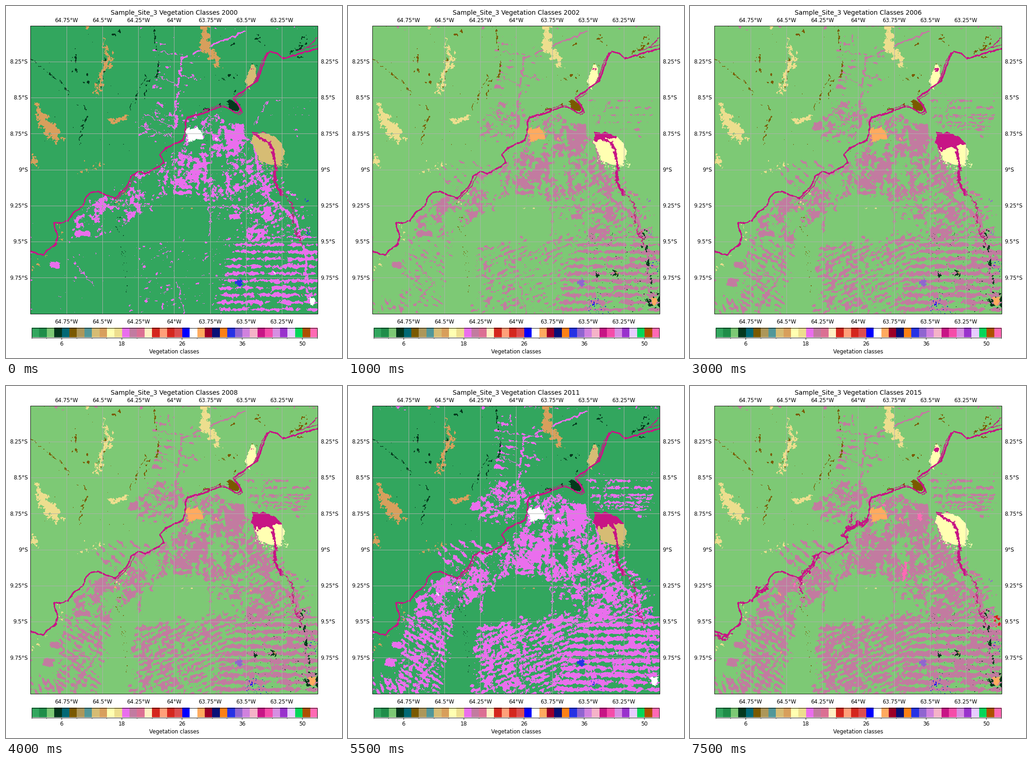
A matplotlib script for the animation above (8000 ms loop, 732 by 765 pixels).

```python
import numpy as np
import matplotlib.pyplot as plt
from matplotlib.animation import FuncAnimation
from matplotlib.path import Path
from matplotlib.colors import to_rgb

W, H, N = 732, 765, 626
L, R, T, B = 53.4, 679.2, 42.8, 668.6
YEARS = range(2000, 2016)

BAR = """32a65e 1f8d49 7dc975 04381d 026975 7a5900 ad975a 519799 d6bc74 d89f5c
ffffb2 edde8e ea6eed c27ba0 db7093 ffefc3 d4271e ffa07a d4271e db4d4f 0000ff
ffffff ffaa5f 9c0027 091077 fc8114 2532e4 9065d0 d082de f5b3c8 c71585 f54ca9
d68fe2 9932cc e6ccff 02d659 ad5100 ff69b4""".split()
RGB = np.array([to_rgb("#" + c) for c in BAR])

(FOREST, PASTURE, WATER, SAVANNA, FIELD, FLOODED, URBAN, CROP, SOY,
 DARK, RED, PINK) = range(12)
# Colour bar slot of each class in the two colour scalings
SCALE_A = np.array([0, 12, 30, 9, 8, 3, 21, 26, 26, 0, 18, 19])
SCALE_B = np.array([2, 13, 30, 11, 10, 5, 22, 27, 20, 3, 18, 37])
A_YEARS = {2000, 2001, 2005, 2011, 2012, 2013, 2014}

rng = np.random.default_rng(7)
Y, X = np.mgrid[0:N, 0:N].astype(float)
X += L
Y += T
FREQ = np.fft.fftfreq(N)
FREQ2 = FREQ[:, None] ** 2 + FREQ**2


def blur(a, r):
    return np.fft.ifft2(np.fft.fft2(a) * np.exp(-2 * np.pi**2 * r * r * FREQ2)).real


def noise(r):
    n = blur(rng.normal(size=(N, N)), r)
    return n / n.std()


JX = noise(3) + 0.6 * noise(0.9)
JY = noise(3) + 0.6 * noise(0.9)
FINE, MID = noise(0.7), noise(2)


def stroke(pts, w=2, rough=1):
    """Ragged line; a third value in a point gives the half width there."""
    x, y = X + rough * JX, Y + rough * JY
    best = np.full((N, N), np.inf)
    for p, q in zip(pts, pts[1:]):
        dx, dy = q[0] - p[0], q[1] - p[1]
        t = np.clip(((x - p[0]) * dx + (y - p[1]) * dy) / (dx * dx + dy * dy), 0, 1)
        half = p[2] + (q[2] - p[2]) * t if len(p) > 2 else w
        best = np.minimum(best, np.hypot(x - p[0] - t * dx, y - p[1] - t * dy) - half)
    return best < 0


def segs(items, w=1, rough=1.6):
    return np.any([stroke([s[:2], s[2:]], w, rough) for s in items], axis=0)


def poly(pts, rough=1.2):
    xy = np.c_[(X + rough * JX).ravel(), (Y + rough * JY).ravel()]
    return Path(pts).contains_points(xy).reshape(N, N)


def rects(items):
    return np.any([(abs(X + JX - x) < w) & (abs(Y + JY - y) < h) for x, y, w, h in items], axis=0)


def blobs(*items, rough=2):
    return np.any([np.hypot(X + rough * JX - x, Y + rough * JY - y) < r for x, y, r in items], axis=0)


def rank(a):
    out = np.empty(a.size)
    out[np.argsort(a, axis=None)] = np.linspace(0, 1, a.size)
    return out.reshape(a.shape)


def shift(pts, dx, dy):
    return [(x + dx, y + dy) for x, y in pts]


# --- rivers and reservoirs
RIVER = [(679, 92), (630, 106), (602, 114), (590, 102), (574, 97), (566, 110),
         (555, 142), (546, 162), (515, 186), (495, 198), (512, 226), (503, 233),
         (478, 219), (465, 218), (430, 233), (396, 241), (391, 252), (390, 275),
         (385, 290), (350, 307), (336, 322), (344, 340), (315, 358), (305, 364),
         (290, 359), (275, 367), (262, 393), (238, 418), (200, 401), (185, 405),
         (174, 414), (168, 433), (145, 450), (135, 466), (120, 471), (104, 470),
         (104, 480), (112, 497), (109, 518), (90, 530), (80, 541), (54, 532)]
JAMARI = [(541, 277), (575, 297), (583, 325), (587, 350), (586, 382), (600, 409),
          (621, 426), (628, 452), (627, 468), (644, 518)]

water = stroke(RIVER, 1.7, .6) | stroke(JAMARI[:6], 2.8, 1.2) | stroke(JAMARI[5:], 1.2, 2)
for a, b, dx, dy in ((0, 2, 3, -9), (4, 9, -5, 3), (8, 12, 4, 3), (12, 15, -2, -4), (25, 28, 6, -1)):
    water |= stroke(shift(RIVER[a:b], dx, dy), .8, .6)
water |= stroke([(676, 71), (657, 90)], 1)

backwater = [(2012, stroke(RIVER[18:21], 4, 3)), (2012, segs([(352, 275, 352, 305)], 1.2, 2)),
             (2013, stroke(RIVER[31:33], 4.5, 4)), (2013, stroke(RIVER[25:28], 3, 3)),
             (2013, segs([(240, 418, 242, 450)], 2, 2)), (2013, stroke(RIVER[33:36], 2.5, 2)),
             (2014, stroke(shift(RIVER[39:], -3, 6), 3, 3))]

basin = poly([(533, 291), (543, 274), (560, 273), (600, 294), (606, 320), (601, 346), (572, 342), (552, 333)])
lake = poly([(538, 124), (546, 135), (546, 155), (528, 182), (521, 160), (528, 140)])
fringe = stroke([(552, 330), (580, 348), (604, 340)], 9, 2) & (FINE > .9)
field = basin | lake | fringe

# --- natural cover
savanna = (stroke([(211, 64, 1), (213, 88, 2), (228, 113, 7), (210, 145, 6), (199, 192, 1)], rough=3.5)
           | stroke([(431, 40, 7), (437, 95, 10), (464, 126, 5)], rough=3.5)
           | stroke([(60, 206, 2), (86, 250, 14), (98, 272, 15), (112, 290, 6)], rough=3.5)
           | stroke([(54, 330, 4), (70, 346, 3)], rough=3)
           | stroke([(226, 246, 3), (245, 248, 6), (262, 243, 3)], rough=3)
           | blobs((176, 45, 4)))
savanna |= (segs([(158, 358, 195, 355), (178, 338, 230, 345), (392, 440, 402, 440),
                  (60, 570, 85, 540), (115, 478, 115, 505), (262, 400, 240, 432)], 5, 3) & (MID > .75))

streams = stroke([(325, 43), (322, 75), (333, 120), (330, 150), (308, 163), (303, 200)], 1.4, 1.5)
streams |= stroke([(54, 115), (105, 155), (122, 166), (146, 206), (183, 230), (168, 250), (162, 300)], 1.2, 1.5)
streams |= segs([(305, 150, 270, 225)])
specks = segs([(148, 100, 148, 145), (174, 145, 172, 168), (232, 58, 250, 55), (492, 85, 504, 90),
               (470, 150, 500, 150), (222, 110, 200, 180), (545, 65, 565, 82)], 6, 2)
marsh = poly([(478, 206), (490, 202), (508, 216), (505, 226), (490, 226)], 1.5)
banks = segs([(620, 103, 662, 74), (628, 112, 642, 108), (533, 126, 544, 126), (497, 186, 520, 172),
              (425, 232, 465, 212), (646, 68, 660, 67)], 2, 2)
flooded = (streams & (MID > -.1) | specks & (MID > 1) | marsh | banks & (MID > 0)
           | stroke([(236, 430), (252, 520), (270, 640)], 4, 2) & (FINE > 1.9)
           | (FINE > 3.4) & (Y < 330) & (X < 480))

# --- cleared land
GROWTH = ([2000, 2002, 2006, 2010, 2014], [0, .25, .55, .82, 1])
regions = []


def region(first, last, angle, spacing, weight, pts):
    """Rows of clearings whose share grows from first to last."""
    a = np.radians(angle)
    u = (-(X - 540) * np.sin(a) + (Y - 518) * np.cos(a) + MID * .8) / spacing
    rows = 2 * np.abs(u - np.round(u))
    score = rank(weight * rows + .2 * noise(.7) + .42 * noise(2.2) + .3 * noise(7))
    regions.append((blur(poly(pts, 4).astype(float), 4), first, last, score))


region(.37, .64, 88, 17, .5, [(392, 246), (515, 238), (522, 412), (365, 410), (335, 385), (385, 300)])
region(.25, .54, 60, 12, .4, [(350, 340), (366, 405), (230, 490), (128, 500), (178, 425), (285, 372)])
region(.35, .62, 0, 15.65, 2.4, [(500, 505), (690, 495), (690, 680), (448, 680)])
region(.3, .6, -28, 11, .9, [(522, 285), (640, 425), (655, 500), (520, 515)])
region(.13, .4, 0, 14, .9, [(430, 415), (520, 410), (520, 515)])
region(.01, .56, 32, 11, 1.2, [(118, 505), (235, 488), (190, 680), (115, 680)])
region(0, .5, 65, 12, 1.5, [(40, 640), (118, 615), (120, 680), (40, 680)])
region(.03, .58, -22, 11, 1.1, [(290, 520), (500, 495), (455, 680), (273, 680)])
region(0, .28, 40, 17, 2, [(186, 358), (290, 325), (325, 345), (220, 400)])
region(.06, .36, -25, 14, .6, [(270, 270), (320, 200), (388, 225), (375, 290), (300, 305)])
region(.03, .16, 9, 16, 2, [(325, 65), (425, 95), (425, 170), (320, 200)])
region(.01, .25, 0, 15.65, 2.5, [(515, 195), (660, 205), (660, 278), (545, 270)])

highway = stroke([(369, 262), (371, 210), (385, 112)], 2.8, 1.6)
highway |= stroke([(385, 112), (430, 92), (520, 55)], 2)
highway |= stroke([(505, 275), (540, 300), (552, 370), (575, 420), (630, 460), (652, 540), (658, 640)], 3)
trails = segs([(333, 98, 372, 103), (378, 150, 424, 156), (328, 150, 378, 172), (300, 235, 368, 262),
               (295, 262, 365, 283), (440, 436, 545, 438), (442, 410, 445, 500), (540, 262, 572, 205),
               (150, 560, 190, 605), (372, 600, 390, 669)])
later = segs([(265, 265, 330, 215), (530, 240, 660, 243), (550, 258, 655, 259), (200, 515, 200, 580),
              (200, 580, 150, 660), (291, 440, 291, 490), (353, 65, 354, 76)], 1.7)
solid = rects([(498, 280, 22, 10), (509, 265, 9, 10), (386, 405, 20, 4), (379, 381, 11, 6),
               (498, 457, 13, 5), (568, 450, 8, 14), (107, 562, 10, 6), (167, 494, 16, 6)])
solid_2005 = rects([(92, 600, 12, 8), (215, 505, 10, 7), (278, 571, 5, 7), (279, 261, 9, 9)])
roads = [(2000, (highway | trails) & (MID > -.9) | solid),
         (2002, segs([(345, 555, 420, 530), (185, 600, 150, 650)])),
         (2005, later & (MID > -.9) | solid_2005)]

# --- towns, crops, scattered classes
city = poly([(392, 266), (413, 263), (430, 275), (428, 288), (412, 294), (397, 296)], 1.8)
towns = [(2000, city | blobs((668, 640, 7), (580, 581, 2), (620, 413, 2), (460, 290, 2.5), (533, 443, 2))),
         (2005, blobs((668, 639, 8.5), (240, 435, 3))),
         (2010, blobs((194, 447, 2.5), (200, 577, 2)))]
crop = blobs((507, 601, 9)) & (MID > -.9) | blobs((656, 420, 3), (660, 495, 3)) & (FINE > .2)
southeast = (X > 520) & (Y > 490)
soy = (blobs((545, 655, 25)) | blobs((668, 565, 14))) & (FINE > 1.6)
dark = (stroke([(644, 490), (655, 590), (658, 635)], 4, 2) & (MID > .6)
        | blobs((643, 520, 6), (545, 580, 5), (580, 580, 6)) & (MID > -.1)
        | blobs((666, 640, 17)) & (MID > .45) | southeast & (FINE > 2.5))
red = stroke(JAMARI[4:], 6, 2) & (FINE > 1.9) | southeast & (FINE > 2.9)
late_red = blobs((668, 505, 7), (672, 520, 6), (621, 537, 2), (283, 440, 2)) & (MID > .5)
pink = blobs((655, 512, 9), (672, 522, 9)) & (MID > .3)
pink_2015 = (blobs((501, 280, 8), (425, 260, 4), (225, 435, 7))
             | segs([(468, 385, 467, 425)], 4)) & (MID > -.4)

LEVELS = [.12, .3, .45, .6, .8, .9, 1, 1, .95, .95, 1, .9, .9, .9, .95, .1]
LAKE_POOL = {2002: 3, 2006: 5, 2014: 7, 2015: 6}


def since(year, items):
    out = np.zeros((N, N), bool)
    for first, mask in items:
        if year >= first:
            out |= mask
    return out


def classify(year):
    c = np.full((N, N), FOREST)
    grown = np.interp(year, *GROWTH)
    for edge, first, last, score in regions:
        c[score < edge * (first + (last - first) * grown)] = PASTURE
    c[since(year, roads)] = PASTURE
    c[flooded] = FLOODED
    c[savanna] = SAVANNA
    c[field] = FIELD
    c[red] = RED
    if year >= 2002:
        c[dark] = DARK
        c[soy] = SOY
    if year >= 2013:
        c[pink] = PINK
        c[late_red] = RED
    if year == 2015:
        c[pink_2015] = PINK
    c[crop] = CROP
    c[since(year, towns)] = URBAN
    shore = 273 + 39 * LEVELS[year - 2000] - .15 * (X - 540) + 3 * MID
    c[basin & (Y < shore)] = WATER
    c[lake & blobs((537, 138, LAKE_POOL.get(year, 1.5)))] = WATER
    c[water | since(year, backwater)] = WATER
    return c


def picture(year):
    slots = SCALE_A if year in A_YEARS else SCALE_B
    return RGB[slots[classify(year)]]


maps = [picture(y) for y in YEARS]

# --- figure
plt.rcParams["font.family"] = "DejaVu Sans"
fig = plt.figure(figsize=(W / 100, H / 100), dpi=100, facecolor="white")
ax = fig.add_axes([0, 0, 1, 1])
ax.axis("off")
LW = .67


def label(x, y, s, ha="center", size=8.33):
    return ax.text(x, y, s, ha=ha, va="baseline", fontsize=size, color="black")


def line(xs, ys, color="black", lw=LW):
    ax.plot(xs, ys, color=color, lw=lw, solid_capstyle="butt")


def frame(x0, x1, y0, y1):
    ax.add_patch(plt.Rectangle((x0, y0), x1 - x0, y1 - y0, fill=False, ec="black", lw=LW, zorder=5))


image = ax.imshow(maps[0], extent=(L, R, B, T), interpolation="nearest", aspect="auto")
step = (R - L) / 8
for i in range(1, 8):
    x, y = L + i * step, T + i * step
    line([x, x], [T, B], "#b0b0b0")
    line([L, R], [y, y], "#b0b0b0")
    west, south = f"{65 - i / 4:g}°W", f"{8 + i / 4:g}°S"
    label(x, 34.5, west)
    label(x, 690, west)
    label(47.5, y + 4.2, south, "right")
    label(685.5, y + 4.2, south, "left")
frame(L, R, T, B)

C0, C1, CT, CB = 55.5, 677.8, 700, 720.5
cell = (C1 - C0) / len(BAR)
ax.imshow(RGB[None], extent=(C0, C1, CB, CT), interpolation="nearest", aspect="auto")
frame(C0, C1, CT, CB)
for i in range(0, len(BAR) + 1, 2):
    x, major = C0 + i * cell, i % 8 == 4
    line([x, x], [CB, CB + (4 if major else 2.3)], lw=LW if major else .5)
for i, name in enumerate((6, 18, 26, 36, 50)):
    label(C0 + (4 + 8 * i) * cell, 738, str(name))
label(366.3, 755, "Vegetation classes")
title = label(366.3, 18.6, "", size=10)
ax.set_xlim(0, W)
ax.set_ylim(H, 0)


def draw(i):
    image.set_data(maps[i])
    title.set_text(f"Sample_Site_3 Vegetation Classes {YEARS[i]}")
    return image, title


anim = FuncAnimation(fig, draw, frames=len(YEARS), interval=500, repeat=True, repeat_delay=0)
plt.show()
```
